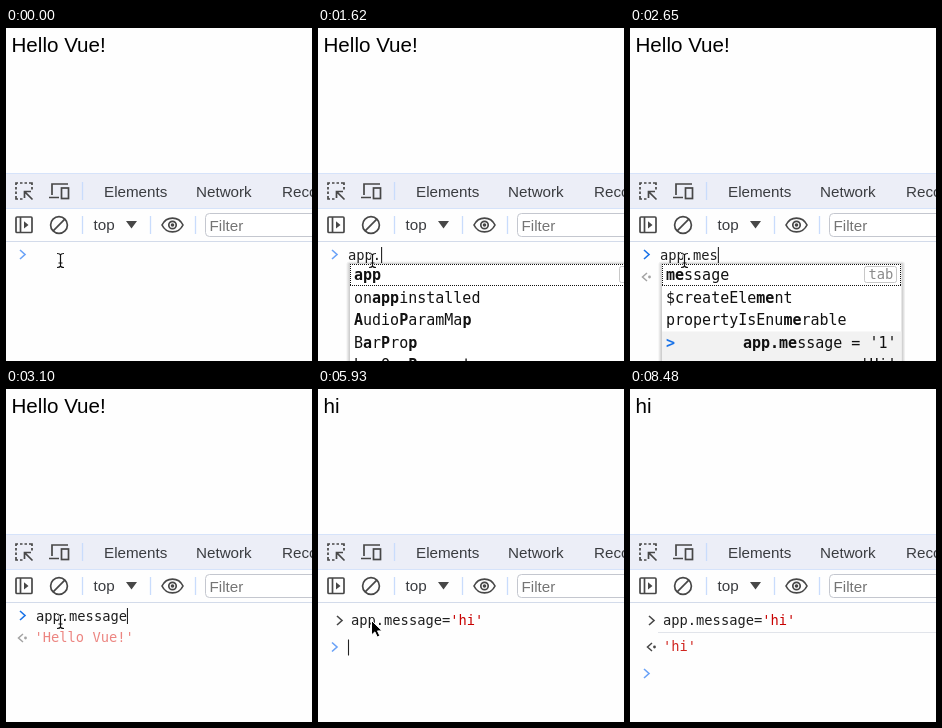
Write an HTML page that moves like this. It is 306x333 px and loops after 8.5 s.

```html
<!DOCTYPE html>
<html lang="en">
<head>
<meta charset="utf-8">
<title>Console demo</title>
<style>
html, body { margin: 0; width: 100%; height: 100%; overflow: hidden; background: #fff; }
svg { display: block; width: 306px; height: 333px; }
text { white-space: pre; }
.ui { font: 15.2px "Liberation Sans", Arial, sans-serif; fill: #3a3c40; }
.page { font: 20.6px "Liberation Sans", Arial, sans-serif; fill: #000; }
.code { font: 13.74px "DejaVu Sans Mono", monospace; fill: #1f1f1f; }
.list { font: 15px "DejaVu Sans Mono", monospace; fill: #111; }
.str { fill: #c80000; }
.b { font-weight: bold; }
.icon { fill: none; stroke: #474747; stroke-width: 1.7; }
.sep { stroke: #c9dcfc; stroke-width: 1.3; }
</style>
</head>
<body>
<svg viewBox="0 0 306 333">
  <rect width="306" height="333" fill="#fefefe"/>
  <text id="page" class="page" x="5.500" y="24"></text>

  <rect y="145" width="306" height="36" fill="#eceef7"/>
  <path d="M0 145.500H306M0 180.500H306" stroke="#d6e3fa"/>
  <path d="M0 213.500H306" stroke="#d3dbea"/>
  <path class="sep" d="M76.500 154V172M76.500 188V206M144.500 188V206M189.500 188V206"/>

  <g class="icon">
    <path d="M10 157V155H12M14 155H16.500M18.500 155H21M23 155H26V157M26 159V161.500M10 159V161.500M10 163.500V166M10 168V171H12M14 171H16.500"/>
    <path d="M18.500 170V163.500H25M18.800 163.800L26.500 171.500"/>
    <path d="M46 167V156H62M43 169.500H53"/>
    <rect x="55.500" y="160" width="7" height="10.500"/>
    <rect x="10" y="189" width="16" height="15.500" rx="1"/>
    <path d="M14.500 189V204.500"/>
    <circle cx="53" cy="197" r="8.400"/>
    <path d="M47.200 202.800L58.800 191.200"/>
    <path d="M156 197C160.500 187.800 172.500 187.800 177 197C172.500 206.200 160.500 206.200 156 197Z"/>
    <circle cx="166.500" cy="197" r="3.700"/>
  </g>
  <path d="M18 193.200V200.600L22.500 196.900ZM120 193H131L125.500 200.500Z" fill="#474747"/>
  <circle cx="166.500" cy="197" r="1.800" fill="#474747"/>

  <g class="ui">
    <text x="98" y="168.500">Elements</text>
    <text x="190" y="168.500">Network</text>
    <text x="276" y="168.500">Recorder</text>
    <text x="87.500" y="202">top</text>
  </g>
  <rect x="199.500" y="185.500" width="140" height="23" rx="4" fill="#fff" stroke="#c4c7cf"/>
  <text class="ui" x="203.500" y="202.500" style="fill:#757575">Filter</text>

  <g id="console"></g>
</svg>
<script>
const LOOP = 8500;
const LIGHT = '#6aa2f7', BLUE = '#1a73e8', DARK = '#474747', FADED = '#a3a3a3';
const CHAR = 8.27, ROW = 22.5;
const pageText = document.getElementById('page');
const consoleBox = document.getElementById('console');

// Asterisks mark the bold part; a leading > or ~ marks a history row.
const lists = {
  a: ['*a*pp', '*a*lert', '*a*tob', '*A*rray', '*A*bortSignal'],
  ap: ['*ap*p', 'on*ap*pinstalled', '*A*udio*P*aramMap', '*a*ddons*P*ref', '*a*p*p*ly'],
  app: ['*app*', 'on*app*installed', '*A*udio*P*aramMa*p*', 'B*a*r*P*ro*p*', 'h*a*sOwn*P*ro*p*erty'],
  dot: ['message', '$attrs', '$children', ">*app.*message = '1'", "~*app.*message = 'Hi'"],
  m: ['*m*essage', '$*m*ount', '$createEle*m*ent', ">*app.m*essage = '1'", "~*app.m*essage = 'Hi'"],
  me: ['*me*ssage', '$createEle*me*nt', 'propertyIsEnu*me*rable', ">*app.me*ssage = '1'", "~*app.me*ssage = 'Hi'"],
  mes: ['*mes*sage', ">*app.mes*sage = '1'", "~*app.mes*sage = 'Hi'"],
  past: [">*app.message* = '1'"]
};

// Start time, typed text, suggestion list, result marker
const steps = [
  [0, ''], [290, 'a'], [440, 'ap', 'a'], [590, 'app', 'ap'], [730, 'app', 'app', 1],
  [1620, 'app.', 'app'], [1770, 'app.', 'dot'], [1920, 'app.m', 'dot'], [2060, 'app.me', 'm'],
  [2210, 'app.me', 'me', 1], [2510, 'app.mes', 'me', 1], [2660, 'app.mess', 'mes', 1],
  [2800, 'app.messa', 'mes', 1], [3100, 'app.message', '', 1], [4000, 'app.message=', 'past'],
  [4290, "app.message='", 'past'], [4440, "app.message='"], [4880, "app.message='h"],
  [5030, "app.message='hi"], [5480, "app.message='hi'"], [5930, '']
];
const caretOff = [[0, 290], [1330, 1620], [3700, 4000], [6680, 6980], [7570, 7870], [8480, 8500]];

const esc = s => s.replace(/&/g, '&amp;').replace(/</g, '&lt;').replace(/>/g, '&gt;');

function text(cls, x, y, inner, extra = '') {
  return `<text class="${cls}" x="${x}" y="${y}" ${extra}>${inner}</text>`;
}

function code(x, y, s) {
  const i = s.indexOf("'");
  const inner = i < 0 ? esc(s) : `${esc(s.slice(0, i))}<tspan class="str">${esc(s.slice(i))}</tspan>`;
  return text('code', x, y, inner);
}

function chevron(x, y, color) {
  return `<path d="M${x} ${y - 4.5}l5 4.500l-5 4.500" fill="none" stroke="${color}" stroke-width="1.600"/>`;
}

function resultMark(x, y, color) {
  return `<path d="M${x + 5} ${y - 4}l-4.500 4l4.500 4" fill="none" stroke="${color}" stroke-width="1.500"/>
    <circle cx="${x + 7.5}" cy="${y}" r="1.400" fill="${color}"/>`;
}

function caret(x, y) {
  return `<path d="M${x} ${y}v16" stroke="#222" stroke-width="1.100"/>`;
}

function bolded(s) {
  return s.split('*').map((p, i) => i % 2 ? `<tspan class="b">${esc(p)}</tspan>` : esc(p)).join('');
}

// Sides start on whole pixels so that each dot fills one pixel.
function dottedBox(left, top, right, bottom) {
  const d = `M${left} ${top + 0.5}H${right}M${left} ${bottom - 0.5}H${right}` +
    `M${left + 0.5} ${top}V${bottom}M${right - 0.5} ${top}V${bottom}`;
  return `<path d="${d}" fill="none" stroke="#111" stroke-dasharray="1 1"/>`;
}

function dropdown(name) {
  const rows = lists[name];
  const top = name === 'past' ? 195.5 : 235.5;
  const right = ['a', 'ap', 'app'].includes(name) ? 339 : 272;
  const w = right - 31.5, h = rows.length * ROW + 1;
  let out = '';
  for (let i = 1; i < 4; i++) {
    out += `<rect x="${31.5 - i}" y="${top - i + 1}" width="${w + 2 * i}" height="${h + 2 * i}" rx="${i}" fill="#000" opacity=".06"/>`;
  }
  out += `<rect x="31.500" y="${top}" width="${w}" height="${h}" fill="#fff" stroke="#cfcfcf"/>`;
  rows.forEach((row, i) => {
    const y = top + i * ROW, base = y + 16.6;
    if ('>~'.includes(row[0])) {
      out += `<rect x="32" y="${y + 0.5}" width="${w - 1}" height="${ROW}" fill="#f2f2f2"/>`;
      if (row[0] === '>') out += text('list b', 36, base, '&gt;', `style="fill:${BLUE}"`);
      out += text('list', right - 5.5, base, bolded(row.slice(1)), 'text-anchor="end"');
    } else {
      out += text('list', 36, base, bolded(row));
    }
  });
  if (name !== 'past') {
    out += dottedBox(32, top + 0.5, right - 1, top + ROW);
    out += `<rect x="${right - 37.5}" y="${top + 3}" width="32" height="16" rx="2" fill="#fff" stroke="#c8c8c8"/>`;
    out += text('code', right - 33.5, top + 15.5, 'tab', 'style="fill:#8a8a8a"');
  }
  return out;
}

function beam() {
  const d = 'M51 226.500Q54 226.500 54.500 228Q55 226.500 58 226.500M54.500 228V239M51 240.500Q54 240.500 54.500 239Q55 240.500 58 240.500M52.500 236H56.500';
  return `<g transform="translate(0 -1)" fill="none"><path d="${d}" stroke="#fff" stroke-width="2.600"/>
    <path d="${d}" stroke="#111" stroke-width="1.200"/></g>`;
}

function arrow(t) {
  if (t >= 7570) return '';
  // The pointer moves in the same short ticks as the screen refreshes.
  const tick = t < 6980 ? 0 : Math.floor((t - 6980) / 147) + 1;
  const p = Math.min(tick, 4) / 4;
  const go = p * (0.5 + 0.5 * p);
  return `<path transform="translate(${53.5 + 143 * go} ${231.5 + 87 * go})" d="M0 0V14.500L3.400 11.400L5.700 16.500L8.300 15.300L6 10.400H10.600Z" fill="#000" stroke="#fff"/>`;
}

function draw(t) {
  const [start, typed, list, marked] = steps.filter(s => s[0] <= t).pop();
  const sent = t >= 5930, done = t >= 6080;
  const caretOn = !caretOff.some(([a, b]) => t >= a && t < b);
  pageText.textContent = sent ? 'hi' : 'Hello Vue!';

  let out = '';
  if (sent) {
    out += chevron(19, 231.5, DARK) + code(33, 236, "app.message='hi'");
    if (done) {
      out += '<path d="M28 243.500H306" stroke="#e1e4ea"/>' + resultMark(17, 258, DARK);
      out += text('code', 33, 262, "'hi'", 'style="fill:#d0251f"');
    }
    const y = done ? 284.5 : 258;
    out += chevron(14, y, LIGHT);
    if (caretOn) out += caret(30.5, y - 7.5);
    out += arrow(t);
  } else {
    out += chevron(14, 226.5, start < 1770 ? LIGHT : BLUE) + code(30, 231.8, typed);
    if (marked) out += resultMark(12, 249, FADED);
    if (marked && start >= 2210) out += text('code', 28.5, 253.3, "'Hello Vue!'", 'style="fill:#ec8581"');
    if (caretOn) out += caret(30.5 + typed.length * CHAR, 219);
    if (list) out += dropdown(list);
    out += beam();
  }
  consoleBox.innerHTML = out;
}

const begin = performance.now();
function frame() {
  draw((performance.now() - begin) % LOOP);
  requestAnimationFrame(frame);
}
frame();
</script>
</body>
</html>
```
